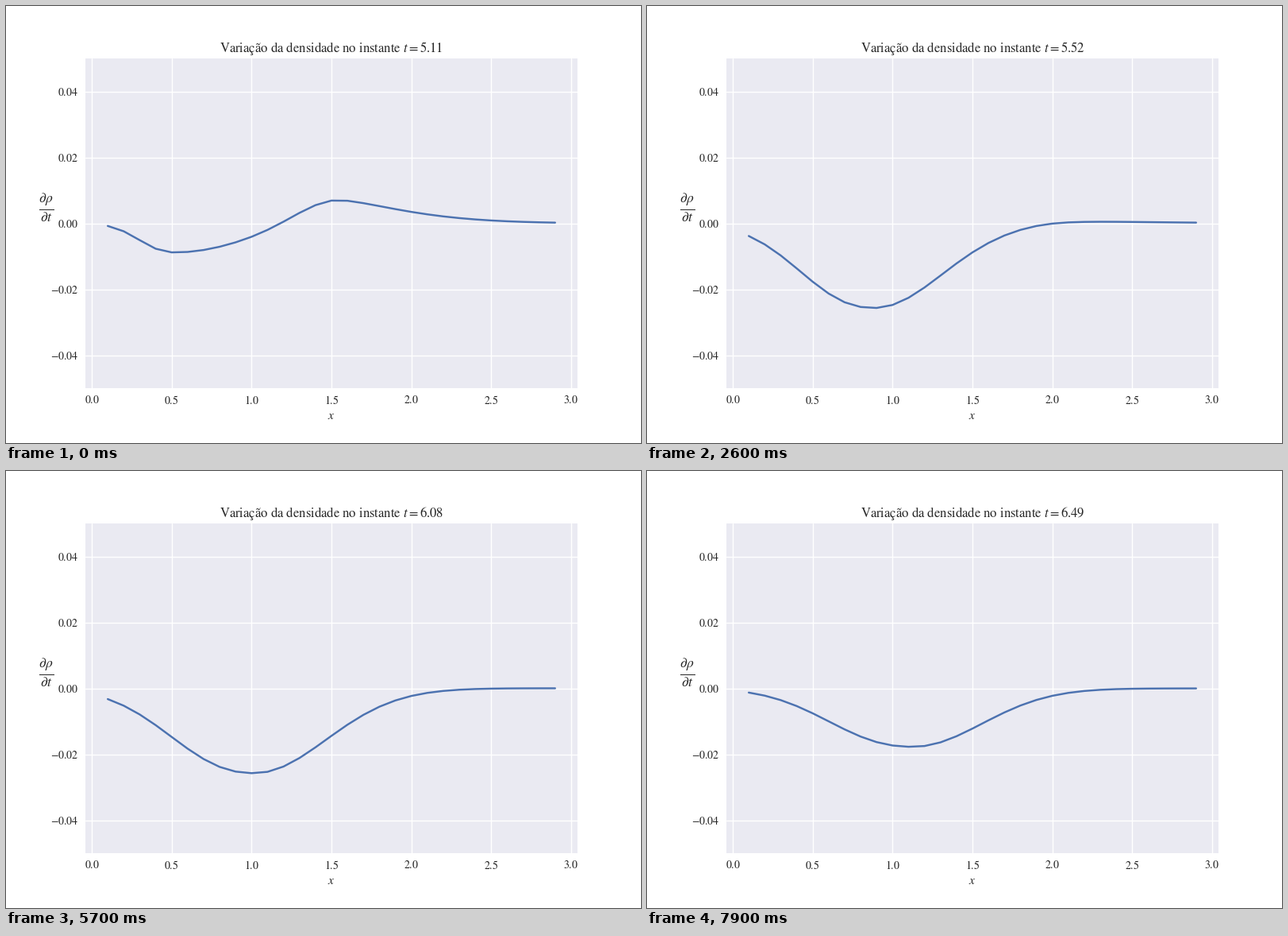
These frames come from a looping animation (800 px wide and 550 px high, 8 s). A matplotlib script:

```python
import numpy as np
import matplotlib.pyplot as plt
from matplotlib.animation import FuncAnimation

FRAMES, INTERVAL = 80, 100

plt.style.use("seaborn-v0_8")
plt.rcParams.update({
    "figure.dpi": 100,
    "savefig.dpi": 100,
    "font.family": "Liberation Serif",
    "mathtext.fontset": "stix",
    "xtick.major.pad": 5.6,
    "ytick.major.pad": 6.3,
})

# Key poses of the trough
KEYS = np.array([0, 18, 35, 57, 79])
DEPTH = np.array([88, 220, 280, 257, 177]) * 1e-4
CENTER = np.array([0.52, 0.79, 0.97, 1.02, 1.13])
LEFT = np.array([0.285, 0.514, 0.66, 0.67, 0.675])
RIGHT = np.array([0.62, 0.62, 0.57, 0.63, 0.605])


def ease(n, values):
    """Cubic path through the key poses, with parabolic slopes."""
    slope = np.gradient(values, KEYS, edge_order=2)
    i = min(np.searchsorted(KEYS, n, side="right") - 1, len(KEYS) - 2)
    h = KEYS[i + 1] - KEYS[i]
    s = (n - KEYS[i]) / h
    start = (1 + 2 * s) * values[i] + s * h * slope[i]
    end = (3 - 2 * s) * values[i + 1] - (1 - s) * h * slope[i + 1]
    return (1 - s) ** 2 * start + s ** 2 * end


def pulse(x, center, left, right, p_left, p_right):
    """Unit bell with its own width and steepness on each side."""
    d = x - center
    return np.where(d < 0,
                    np.exp(-(np.abs(d) / left) ** p_left),
                    np.exp(-(np.abs(d) / right) ** p_right))


def density_rate(x, n):
    depth, center, left, right = (ease(n, v) for v in (DEPTH, CENTER, LEFT, RIGHT))
    trough = depth * pulse(x, center, left, right, 2.3, 2)
    # The crest ahead fades while it drifts right and spreads
    crest = 77e-4 * np.exp(-n / 11) * pulse(
        x, 1.53 + 0.0195 * n, 0.35, 0.56 + 0.0095 * n, 2, 1.4)
    return crest - trough


def clock(n):
    return 5.1125 + 0.01453 * n + 5.46e-5 * n ** 2 - 2.25e-7 * n ** 3


def roman(text):
    return r"\mathrm{" + text.replace(" ", r"\hspace{0.346}") + "}"


def ticks(values, digits):
    return values, [f"${v:.{digits}f}$" for v in values]


x = np.arange(1, 30) / 10
heading = roman("Variação da densidade no instante ")

fig, ax = plt.subplots(figsize=(8, 5.5))
fig.subplots_adjust(left=0.125, right=0.9, bottom=0.125, top=0.88)
line, = ax.plot(x, density_rate(x, 0))
ax.set_xlim(-0.04, 3.04)
ax.set_ylim(-0.05, 0.05)
ax.set_xticks(*ticks([0, 0.5, 1, 1.5, 2, 2.5, 3], 1))
ax.set_yticks(*ticks([-0.04, -0.02, 0, 0.02, 0.04], 2))
ax.set_xlabel("$x$")
ax.set_ylabel(r"$\frac{\partial \rho}{\partial t}$", rotation=0, fontsize=18)
title = ax.set_title("")


def update(n):
    line.set_ydata(density_rate(x, n))
    title.set_text(f"${heading}t={clock(n):.2f}$")
    return line, title


anim = FuncAnimation(fig, update, frames=FRAMES, interval=INTERVAL,
                     repeat=True, repeat_delay=0, blit=False)
plt.show()
```
